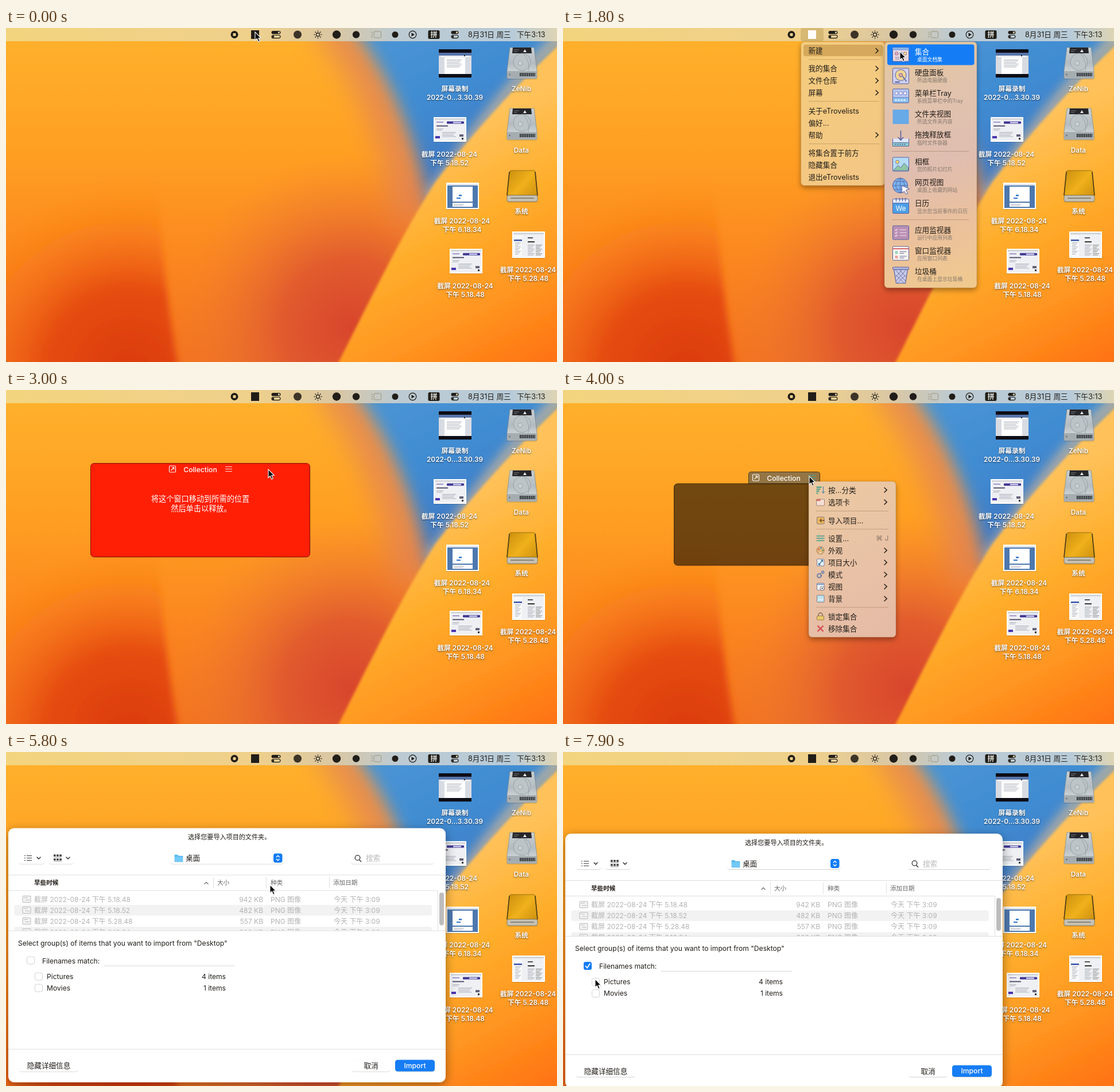
These frames come from a looping animation (960x581 px, 8 s). An HTML page:

```html
<!DOCTYPE html>
<html lang="zh-CN">
<head>
<meta charset="utf-8">
<title>Desktop</title>
<style>
html,body{margin:0;width:100%;height:100%;overflow:hidden;background:#f9951f}
svg{display:block;width:100vw;height:100vh}
text{font-family:Inter,"Noto Sans CJK SC","Noto Sans CJK",sans-serif;white-space:pre}
.hl{opacity:0}
.on .hl,.open .hl{opacity:1}
.open .hl{fill:#a9782f;fill-opacity:.42}
.on text{fill:#fff}
.on .chev{stroke:#fff}
.label text{filter:drop-shadow(0 1px 1px rgba(0,0,0,.6))}
</style>
</head>
<body>
<svg id="stage" viewBox="0 0 960 581" preserveAspectRatio="none"></svg>
<script>
const INK = '#211d18', BLUE = '#147df5', LINE = '#56609f';

const T = (x, y, s, size = 12.6, fill = INK, extra = '') =>
  `<text x="${x}" y="${y + size * .36}" font-size="${size}" fill="${fill}" ${extra}>${s}</text>`;
const R = (x, y, w, h, fill, r = 0, extra = '') =>
  `<rect x="${x}" y="${y}" width="${w}" height="${h}" rx="${r}" fill="${fill}" ${extra}/>`;
const C = (x, y, r, fill, extra = '') => `<circle cx="${x}" cy="${y}" r="${r}" fill="${fill}" ${extra}/>`;
const P = (d, stroke, w = 1, fill = 'none', extra = '') =>
  `<path d="${d}" stroke="${stroke}" stroke-width="${w}" fill="${fill}" ${extra}/>`;
const G = (x, y, s, extra = '') => `<g transform="translate(${x} ${y})" ${extra}>${s}</g>`;
const show = (id, s) => `<g id="${id}">${s}</g>`;
const MID = 'text-anchor="middle"', END = 'text-anchor="end"';
const stops = list => list.map(([o, c, a = 1]) => `<stop offset="${o}" stop-color="${c}" stop-opacity="${a}"/>`).join('');
const lin = (id, x1, y1, x2, y2, list) =>
  `<linearGradient id="${id}" gradientUnits="userSpaceOnUse" x1="${x1}" y1="${y1}" x2="${x2}" y2="${y2}">${stops(list)}</linearGradient>`;
const rad = (id, x, y, r, list) =>
  `<radialGradient id="${id}" gradientUnits="userSpaceOnUse" cx="${x}" cy="${y}" r="${r}">${stops(list)}</radialGradient>`;
const blur = n => `<filter id="b${n}" x="-40%" y="-40%" width="180%" height="180%"><feGaussianBlur stdDeviation="${n}"/></filter>`;
const shadow = (id, dy, sd, a) =>
  `<filter id="${id}" x="-20%" y="-20%" width="140%" height="140%"><feDropShadow dx="0" dy="${dy}" stdDeviation="${sd}" flood-opacity="${a}"/></filter>`;

const defs = '<defs>' +
  lin('sky', 0, 23, 0, 581, [[0, '#ffb02b'], [.35, '#ff9f22'], [.7, '#fb851f'], [1, '#f27220']]) +
  rad('ember', 215, 600, 330, [[0, '#db390f'], [.45, '#e4480f', .9], [1, '#ff8a12', 0]]) +
  rad('glow', 600, 520, 300, [[0, '#d8452c'], [.4, '#dd5530', .85], [1, '#ee8238', 0]]) +
  lin('sea', 640, 23, 760, 280, [[0, '#4a94d4'], [.5, '#3f8bd2'], [1, '#4176c0']]) +
  lin('petal', 735, 210, 930, 581, [[0, '#ffc25a'], [.35, '#ffae2c'], [.7, '#ff9420'], [1, '#ff7512']]) +
  lin('bar', 0, 0, 960, 0, [[0, '#f3d47e'], [.45, '#efd08c'], [.6, '#d9c7a4'], [.71, '#bccad2'], [.92, '#b8cbd8'], [1, '#ddd4b4']]) +
  lin('menuA', 414, 24, 560, 274, [[0, '#f4cc7d'], [1, '#f3c685']]) +
  lin('menuB', 570, 24, 700, 452, [[0, '#e4c99f'], [.25, '#e1c3ad'], [.5, '#dfbdb0'], [.75, '#ebc19d'], [1, '#f0c98e']]) +
  lin('menuC', 428, 159, 580, 430, [[0, '#eccaa2'], [.6, '#e8c1a6'], [1, '#e5baa6']]) +
  lin('steel', 0, 0, 0, 46, [[0, '#c9d0d3'], [.6, '#b3bcc1'], [1, '#d4d9da']]) +
  lin('gold', 0, 0, 50, 44, [[0, '#c98e0c'], [.55, '#f0b11c'], [1, '#cf920f']]) +
  [2, 6, 10, 14, 24].map(blur).join('') + shadow('float', 4, 5, .35) + shadow('sheet', 5, 9, .4) + shadow('lift', .6, .7, .3) +
  '<clipPath id="list"><rect x="4" y="251" width="748" height="69"/></clipPath></defs>';

const wallpaper =
  R(0, 0, 960, 581, 'url(#sky)') +
  R(270, 150, 500, 431, 'url(#glow)') +
  P('M-40 200H262Q268 420 305 620H-40Z', 'none', 0, 'url(#ember)', 'filter="url(#b6)"') +
  P('M560 -20Q680 110 715 330', '#dc8060', 70, 'none', 'filter="url(#b24)" opacity=".7"') +
  P('M580 -30Q695 105 736 310L800 310L990 0V-30Z', 'none', 0, 'url(#sea)', 'filter="url(#b14)"') +
  P('M738 295C810 190 880 95 975 5', '#f5c489', 16, 'none', 'filter="url(#b10)" opacity=".8"') +
  P('M570 600C640 462 690 358 748 268C815 182 890 95 985 10H1000V620H570Z', 'none', 0, 'url(#petal)', 'filter="url(#b2)"');

const rays = Array.from({length: 8}, (_, i) =>
  `<path d="M0 -5V-7" stroke="${INK}" stroke-width="1.3" transform="rotate(${i * 45})"/>`).join('');
const switches = (x, w) => G(x, 11.5,
  R(-w, -6.5, 2 * w, 5.6, INK, 2.8) + C(w - 3, -3.7, 1.7, '#d8c9a0') +
  R(-w + .5, 1, 2 * w - 1, 5.2, 'none', 2.6, `stroke="${INK}" stroke-width="1.2"`) + C(-w + 3, 3.6, 1.9, INK));
const menubar =
  R(0, 0, 960, 23, 'url(#bar)') + show('press', R(414, 0, 40, 23, '#b99b55', 4, 'opacity=".45"')) +
  C(398, 11.5, 6.5, INK) + R(395.5, 9, 5, 5, '#efd08c', 1) +
  `<rect id="app" x="427" y="4" width="14" height="15"/>` +
  switches(470.5, 8) + C(508, 11.5, 7, '#3d3428') +
  G(543.5, 11.5, C(0, 0, 3, 'none', `stroke="${INK}" stroke-width="1.3"`) + rays) +
  C(576, 11.5, 7.2, INK) + C(610, 11.5, 6.2, INK) +
  G(645, 11.5, R(-4, -5.5, 12.5, 11, 'none', 2, 'stroke="#9c957f"') + P('M-8.5 -4h2M-8.5 0h2M-8.5 4h2', '#9c957f', 1.6)) +
  C(678, 11.5, 5.5, INK) +
  C(708.5, 11.5, 6.3, 'none', `stroke="${INK}" stroke-width="1.2"`) + P('M706.5 8.3L712 11.5L706.5 14.7Z', 'none', 0, INK) +
  R(735.5, 4, 20, 15, INK, 2.5) + T(745.5, 11.3, '拼', 12, '#e2e4df', MID + ' font-weight="600"') +
  switches(782, 6.5) + T(805, 11.3, '8月31日 周三', 12.6) + T(890, 11.3, '下午3:13', 12.6);

const label = (x, y, ...rows) => '<g class="label">' +
  rows.map((s, i) => T(x, y + i * 15, s, 11.8, '#fff', MID + ' font-weight="600"')).join('') + '</g>';
const disk = (x, y) => G(x, y,
  P('M5 0H47L52 40V52Q52 54 50 54H2Q0 54 0 52V40Z', '#7c858a', .6, 'url(#steel)') +
  P('M10 0H42L43 10H9Z', 'none', 0, '#26282a') + P('M28 8L31 3L34 8Z', 'none', 0, '#e8e8e8') + P('M12 4h9M12 7h6', '#8a8d90', .8) +
  C(26, 25, 15, '#bcc4c8', 'stroke="#8d979c" stroke-width=".8"') + C(23, 27, 4, '#c9d0d3', 'stroke="#8d979c" stroke-width=".7"') +
  P('M30 12Q42 28 36 43', '#929ba0', .8) + R(0, 41, 52, 12.5, '#a5adb1', 2) +
  P('M22 47h27', '#303437', 6, 'none', 'stroke-dasharray="2.2 1"') + C(4.5, 47, 1.2, '#666'), 'filter="url(#lift)"');
const drive = G(873, 248,
  P('M7 0H46Q48 0 48.500 2L53 43H0L4.500 2Q5 0 7 0Z', '#8b6410', .8, 'url(#gold)') +
  P('M4 2L0 43M49 2L53 43', '#4e3d19', 1.6) + R(0, 43, 53, 11, '#c5c1b4', 3, 'stroke="#77705c" stroke-width=".7"') +
  R(6, 47, 41, 2, '#8b8675', 1), 'filter="url(#lift)"');
const page = (x, y, w, h, inner) => G(x, y, R(0, 0, w, h, '#fff', 0, 'filter="url(#lift)"') + R(2, 2, w - 4, h - 4, '#eef0f3') + inner);
const lines = (x, y, w, n, c = '#9aa0ab') => Array.from({length: n}, (_, i) => R(x, y + i * 2.5, w - i % 3 * 2, .8, c)).join('');
const webPage = (x, y) => page(x, y, 57, 43,
  R(2, 2, 53, 2.5, '#cfd3d8') + R(5, 8, 12, 1.5, '#8d7ac0') + R(23, 7.5, 30, 4, '#3d3593', 1) + R(34, 8.5, 14, 2, '#e8e8ff') +
  R(5, 14.5, 20, 1.8, '#4b4665') + lines(5, 20, 12, 2) + lines(15, 26, 24, 4) + R(3, 33, 8, 4, '#4a35b0') + R(45, 30, 7, 4, '#66627a') + R(49, 36, 3, 3, '#333'));
const desktop =
  G(754, 37, R(0, 0, 57, 49, '#101114', 1, 'filter="url(#lift)"') + R(0, 6, 57, 37, '#d7dbe2') + R(0, 6, 57, 5, '#5674a8') +
    R(3, 11, 51, 3, '#eceef2') + R(10, 14, 36, 29, '#fff') + lines(14, 18, 26, 6) + C(45, 11, 1.2, '#222')) +
  webPage(745, 155) + webPage(773, 384) +
  page(767, 269, 57, 46, R(2, 2, 53, 42, '#4d78ae') + R(2, 2, 53, 3, '#dde3ea') + R(11, 7, 35, 26, '#fff') + R(11, 35, 35, 7, '#fff') +
    R(22, 21, 5, 2.5, '#2f74d0') + R(18, 26, 7, 2, '#2f74d0') + lines(13, 37, 18, 2)) +
  page(882, 354, 57, 46, R(2, 2, 53, 3, '#d3d6da') + R(3, 7, 14, 36, '#f9f9f9') + R(3, 14, 14, 2.5, '#3550a8') + lines(5, 19, 10, 9) +
    R(27, 10, 9, 2, '#555') + R(27, 17, 12, 2, '#333') + lines(27, 23, 12, 8) + lines(41, 23, 11, 8, '#777')) +
  disk(873, 34) + disk(873, 140) + drive +
  label(782, 106, '屏幕录制', '2022-0...3.30.39') + label(772.5, 220, '截屏 2022-08-24', '下午 5.18.52') +
  label(794.5, 336, '截屏 2022-08-24', '下午 6.18.34') + label(800, 449, '截屏 2022-08-24', '下午 5.18.48') +
  label(909.5, 421, '截屏 2022-08-24', '下午 5.28.48') + label(898, 106, 'ZeNib') + label(898, 212.5, 'Data') + label(898, 319, '系统');

// Menus
const chev = (x, y) => P(`M${x - 2} ${y - 4}l4.200 4l-4.200 4`, INK, 1.5, 'none', 'class="chev" stroke-linecap="round"');
const box = (x, y, w, h, fill) => R(x, y, w, h, fill, 6, 'filter="url(#float)" stroke="#7a5a30" stroke-opacity=".35" stroke-width=".7"');
const rules = (x1, x2, ...ys) => ys.map(y => P(`M${x1} ${y}H${x2}`, '#5a3d1c', 1, 'none', 'opacity=".28"')).join('');
const hl = (x, y, w, h) => R(x, y, w, h, BLUE, 4, 'class="hl"');

const mainRows = [[39.5, '新建', 1], [70.5, '我的集合', 1], [91.5, '文件仓库', 1], [112.5, '屏幕', 1], [144, '关于eTrovelists'],
  [165, '偏好...'], [186, '帮助', 1], [217, '将集合置于前方'], [238, '隐藏集合'], [259, '退出eTrovelists']];
const mainMenu = box(414.5, 24, 146, 250, 'url(#menuA)') + rules(428, 551, 55, 127.5, 201.5) +
  mainRows.map(([y, s, sub], i) => `<g id="main${i}">${hl(419, y - 10.5, 138, 20)}${T(427.5, y, s)}${sub ? chev(547, y) : ''}</g>`).join('');

const card = (fill, h = 24) => R(0, 0, 28, h, fill, 1.5, `stroke="${LINE}"`);
const dots = (y, ...cs) => cs.map((c, i) => R(4 + i * 7.5, y, 5, 5, c, 1, `stroke="${LINE}" stroke-width=".7"`)).join('');
const checks = (c, y = 7) => [0, 1, 2].map(i => P(`M4 ${y + i * 5}l1.500 1.500l3 -3M12 ${y + i * 5}h12`, c, 1.2)).join('');
const icons = [
  card('#f0d9dc') + R(0, 0, 28, 5, '#8fb2e8', 1) + dots(8, '#f2a9b4', '#9fd0ee', '#f6d68c') + P('M4 17h20M4 20h14', LINE, .8),
  card('#cfd0ee', 27) + C(14, 12, 9.5, '#f1d596', `stroke="${LINE}"`) + C(14, 12, 3, '#f4a6a0', `stroke="${LINE}"`) + P('M24 23L17 14', LINE, 1.6) + R(4, 23, 8, 2, LINE),
  card('#b7c7f3') + dots(5, '#f6f0ff', '#f6f0ff', '#f6f0ff') + R(0, 15, 28, 9, '#8cc2ef', 1, `stroke="${LINE}" stroke-width=".8"`) + P('M4 19.500h20', '#fff', 2, 'none', 'stroke-dasharray="3 2"'),
  R(0, 0, 28, 25, '#68a9e8'),
  P('M0 14V27H28V14', LINE, 1, '#dbe5fb') + R(0, 21, 28, 6, '#8fd0cf', 1, `stroke="${LINE}"`) + P('M4 24h20', LINE, 2, 'none', 'stroke-dasharray="2 2"') + P('M14 0V16M9.500 11.500L14 16.500L18.500 11.500', LINE, 1.6),
  card('#b5dcf7') + C(8, 8, 3, '#f9d56c', `stroke="${LINE}" stroke-width=".8"`) + P('M1 23L9 14L14 18L20 10L27 18V23Z', LINE, .8, '#8fc7a6'),
  C(13, 13, 13, '#79b4ef', `stroke="${LINE}"`) + P('M0 13H26M13 0V26M3 6H23M3 20H23M13 0C3 8 3 18 13 26M13 0C23 8 23 18 13 26', LINE, .9) + P('M16 13L29 19L23 21L26 27L23 28L20 23L16 26Z', LINE, 1, '#fff'),
  card('#4d9fe6', 25) + R(0, 0, 28, 7, '#e8eefb', 1, `stroke="${LINE}"`) + P('M6 -2V4M12 -2V4M17 -2V4M22 -2V4', LINE, 1.3) + T(14, 16, 'We', 12, '#fff', MID),
  card('#b98fb4') + checks('#f5e3ee'),
  card('#fdf8f2') + P('M0 4H28', '#d66b70', 2) + R(4, 8, 5, 5, '#9ed7bd') + R(4, 16, 5, 5, '#f1a1a1') + P('M12 9h12M12 12h8M12 17h12M12 20h8', LINE, 1.1),
  P('M2 4H26L22 28H6Z', LINE, 1.2, '#c9cbe6') + R(0, 0, 28, 4, '#b5b8de', 1, `stroke="${LINE}"`) + P('M5 5L22 24M12 5L23 17M23 5L6 24M16 5L5 17M8 28L22 14M20 28L6 14', LINE, .8)];
const subRows = [[41, '集合', '桌面文档集'], [77, '硬盘面板', '所选电脑硬盘'], [113, '菜单栏Tray', '系统菜单栏中的Tray'], [149, '文件夹视图', '所选文件夹内容'],
  [185.5, '拖拽释放框', '临时文件容器'], [232, '相框', '您的照片幻灯片'], [268, '网页视图', '桌面上收藏的网站'], [304.5, '日历', '显示您当前事件的日历'],
  [351, '应用监视器', '运行中应用列表'], [387, '窗口监视器', '应用窗口列表'], [423, '垃圾桶', '在桌面上显示垃圾桶']];
const subMenu = box(560, 24, 161, 428, 'url(#menuB)') + rules(573, 707, 214.5, 333.5) +
  subRows.map(([y, a, b], i) => `<g id="sub${i}">${hl(565, y - 12.5, 151.5, 36)}${G(574.5, y - 7, icons[i])}` +
    T(613, y, a) + T(617, y + 14, b, 8.8, '#85786d') + '</g>').join('');

const mini = (fill, d, c = '#4d6b94') => R(-6, -6, 12.5, 12, fill, 1, 'stroke="#6d6a78" stroke-width=".8"') + P(d, c, 1.3);
const popRows = [
  [174, '按...分类', P('M-7 -5h9M-7 -1.500h7M-7 2h5M-7 5.500h3', '#3e9c85', 1.8) + P('M5 -6V5M2.500 2.500L5 5.500L7.500 2.500', '#4b7fa8', 1.1), 1],
  [195, '选项卡', R(-7, -5, 14, 11, '#f4ded4', 1, 'stroke="#94706a" stroke-width=".8"') + R(-7, -5, 7, 3, '#d66e62'), 1],
  [227, '导入项目...', mini('#eeb75f', 'M7 0H-1M2 -3L-1 0L2 3', '#765025')],
  [258, '设置...', P('M-7 -4h14M-7 0h14M-7 4h14', '#4e9483', 1.4) + C(-3, -4, 2, '#78bca6') + C(3, 0, 2, '#78bca6') + C(-2, 4, 2, '#78bca6')],
  [279, '外观', C(0, 0, 6.5, '#e5b57b', 'stroke="#956b3d" stroke-width=".8"') + C(-3, -2, 1.5, '#d65b52') + C(1, -4, 1.4, '#4d91cc') + C(4, 0, 1.4, '#55a765') + C(0, 4, 1.6, '#f3dfc8'), 1],
  [300, '项目大小', mini('#e5f1f8', 'M-3 4L4 -4M1 -4H4V-1M-3 1V4H0', '#3c76a8'), 1],
  [321, '模式', C(-2, 2, 3.4, 'none', 'stroke="#5a78a8" stroke-width="2.4" stroke-dasharray="2 .7"') + C(4, -4, 2, 'none', 'stroke="#5a78a8" stroke-width="2" stroke-dasharray="1.500 .5"'), 1],
  [342, '视图', mini('#eef2fa', 'M-6 -4H6', '#3e76bc') + C(3, 3, 3.5, '#fff', 'stroke="#555" stroke-width=".8"') + C(3, 3, 1.2, '#345'), 1],
  [363, '背景', mini('#c0e0ee', 'M-5 4L-1 0L2 3L5 0', '#e9f6ff'), 1],
  [394, '锁定集合', P('M-3.500 -1V-4Q0 -9 3.500 -4V-1', '#826a48', 1.3) + R(-6, -1, 12, 7, '#ecca68', 1, 'stroke="#826a48" stroke-width=".8"')],
  [415, '移除集合', P('M-5 -5L5 5M5 -5L-5 5', '#d64e55', 2.4)]];
const popup = box(428, 159, 152, 271, 'url(#menuC)') + rules(441, 567, 210.5, 242, 378) +
  popRows.map(([y, s, ico, sub], i) => `<g id="pop${i}">${hl(433, y - 10.5, 142, 20.5)}${G(448.5, y, ico)}${T(462, y, s)}${sub ? chev(562, y) : ''}</g>`).join('') +
  T(545, 258, '⌘ J', 12, '#8e7868');

// Collection window
const openIcon = (x, y) => G(x, y, R(-5.5, -5.5, 11, 11, 'none', 1.5, 'stroke="#fff" stroke-width="1.1"') + P('M-2.500 2.500L2.500 -2.500M-1 -2.700H2.700V1', '#fff', 1.1));
const bars = (x, y, c) => P(`M${x - 6} ${y - 4}h12M${x - 6} ${y}h12M${x - 6} ${y + 4}h12`, c, 1.2);
const redBox = R(.5, .5, 382, 163, '#ff1f05', 6, 'stroke="#7d1208"') + openIcon(143, 10.5) + bars(241, 10.5, '#ffe0d8') +
  T(191.5, 11.5, 'Collection', 12.2, '#fff', MID + ' font-weight="500"') +
  T(191.5, 62, '将这个窗口移动到所需的位置', 13.2, '#fff', MID) + T(193, 79.5, '然后单击以释放。', 13.2, '#fff', MID);
const darkBox = P('M323.500 163V147Q323.500 142.500 328 142.500H443Q447.500 142.500 447.500 147V163Z', '#4e3714', 1, '#8c7248', 'fill-opacity=".93"') +
  R(193.5, 163, 382, 142, '#000', 6, 'fill-opacity=".555" stroke="#3e2808"') +
  openIcon(336, 152.5) + T(384.5, 153.5, 'Collection', 12.2, '#fff', MID + ' font-weight="500"') + bars(434, 152.5, '#35aaa4');

// Import panel
const button = (x, y, w, h = 20, fill = '#fff') => R(x, y, w, h, fill, 4.5, 'filter="url(#lift)"');
const down = (x, y) => P(`M${x - 3} ${y - 1.5}l3 3l3 -3`, '#333', 1.5, 'none', 'stroke-linecap="round"');
const hr = (y, x1 = 4, x2 = 766, c = '#dedede') => P(`M${x1} ${y + .5}H${x2}`, c);
const check = (x, y) => R(x, y, 13, 13, '#fff', 3, 'stroke="#d2d2d2"');
const files = [['5.18.48', 942], ['5.18.52', 482], ['5.28.48', 557], ['6.18.34', 266]];
const fileRow = ([s, kb], i) => {
  const y = 266 + i * 19, c = '#b3b3b3';
  return (i % 2 ? R(14, y - 9.5, 728, 18.5, '#f2f2f2', 4) : '') + R(29, y - 6, 14, 11, '#f4f4f4', 1, 'stroke="#b5b5b5"') + P(`M31 ${y - 3}h7M33 ${y + 1}h8`, '#b9b9b9', 1.2) +
    T(49, y, '截屏 2022-08-24 下午 ' + s, 12, c) + T(448, y, kb + ' KB', 12, c, END) + T(461, y, 'PNG 图像', 12, c) + T(571, y, '今天 下午 3:09', 12, c);
};
const panel = R(4, 142, 762, 442, '#fff', 10, 'filter="url(#sheet)"') +
  T(317, 158, '选择您要导入项目的文件夹。', 11.1) + button(23, 184, 44) + button(74, 184, 44) + button(286, 185, 198, 19) + button(601, 185, 145, 19) +
  P('M32 190h2M32 194h2M32 198h2M36 190h9M36 194h9M36 198h9', '#333', 1.2) + down(57, 194) + down(108, 194) +
  P('M83 189.500h14M83 196.500h14', '#444', 3.5, 'none', 'stroke-dasharray="3.700 1.400"') + P('M83 192.700h14M83 199.700h14', '#888', .8) +
  P('M294 188.500h5l1.500 2H308V200.500H294Z', '#3da5e6', .6, '#5bbcf2') + R(294, 192, 14, 8.5, '#72c9f7', 1) + T(313, 194, '桌面') +
  R(466, 186, 15.5, 16, BLUE, 4) + P('M471 192.500l2.800 -2.800l2.800 2.800M471 195.500l2.800 2.800l2.800 -2.800', '#fff', 1.4) +
  C(612.5, 193.5, 4.3, 'none', 'stroke="#333" stroke-width="1.3"') + P('M615.500 197L619 200.500', '#333', 1.5) + T(627, 194, '搜索', 12.6, '#b8b8b8') +
  hr(223) + hr(250, 4, 752) + P('M361.500 227V247M453.500 227V247M563.500 227V247M752.500 251V320', '#dedede') +
  T(49, 237, '早些时候', 10.6, INK, 'font-weight="700"') + P('M345.500 239.500l3.500 -3.500l3.500 3.500', '#666', 1.1) +
  T(368, 237, '大小', 10.6, '#666') + T(461, 237, '种类', 10.6, '#666') + T(570, 237, '添加日期', 10.6, '#666') +
  `<g clip-path="url(#list)">${files.map(fileRow).join('')}</g>` + R(755, 254, 8, 57, '#bdbdbd', 4) + hr(320) +
  T(21, 342, 'Select group(s) of items that you want to import from "Desktop"', 12.1) +
  check(36.5, 365.5) + show('tick', R(36, 365, 14, 14, BLUE, 3.5) + P('M39.500 372.500l2.700 3l4.500 -7', '#fff', 1.8, 'none', 'stroke-linecap="round"')) +
  T(63, 373, 'Filenames match:', 12.1) + hr(381, 171, 399, '#d5d5d5') +
  check(50.5, 393.5) + check(50.5, 413.5) + T(71, 400, 'Pictures', 12.1) + T(71, 420, 'Movies', 12.1) +
  T(383, 400, '4 items', 12.1, INK, END) + T(383, 420, '1 items', 12.1, INK, END) + hr(526) +
  button(23, 545, 103) + T(74.5, 555, '隐藏详细信息', 12.6, INK, MID) + button(602, 545, 68) + T(636, 555, '取消', 12.6, INK, MID) +
  button(678, 545, 69, 20, BLUE) + T(712.5, 555, 'Import', 12.2, '#fff', MID + ' font-weight="500"');

const arrow = P('M0 0V14.500L3.300 11.500L5.700 17L8.200 16L5.900 10.500H10.300Z', '#fff', 1.1, '#000', 'filter="url(#lift)"');

document.getElementById('stage').innerHTML = defs + wallpaper + desktop + menubar + show('dark', darkBox) + show('red', redBox) +
  show('main', mainMenu) + show('sub', subMenu) + show('pop', popup) + show('panel', panel) + show('cursor', arrow);

const $ = id => document.getElementById(id);
const path = [[0, 434, 7], [300, 434, 7], [700, 470, 37], [1200, 510, 40], [1800, 587, 41], [2000, 587, 41], [2500, 370, 110],
  [2800, 411, 123], [3200, 503, 153], [3400, 503, 153], [3800, 429, 150], [4200, 429, 150], [4800, 461, 232], [5700, 461, 232],
  [5800, 460, 231], [6100, 460, 231], [6700, 330, 345], [7300, 41, 369], [7600, 43, 371], [7900, 56, 395]];

function cursorAt(t) {
  const i = path.findIndex(k => k[0] >= t);
  if (i < 1) return path[i < 0 ? path.length - 1 : 0].slice(1);
  const a = path[i - 1], b = path[i], u = (t - a[0]) / (b[0] - a[0]), e = u * u * (3 - 2 * u);
  return [a[1] + (b[1] - a[1]) * e, a[2] + (b[2] - a[2]) * e];
}
const visible = (id, on) => $(id).setAttribute('display', on ? 'inline' : 'none');
const move = (id, x, y) => $(id).setAttribute('transform', `translate(${x.toFixed(1)} ${y.toFixed(1)})`);

function draw(ms) {
  const t = Math.floor(ms / 100) * 100, within = (a, b) => t >= a && t < b;
  const [x, y] = cursorAt(t), menu = within(300, 2100), sub = within(800, 2100);
  visible('press', menu);
  visible('main', menu);
  visible('sub', sub);
  $('app').setAttribute('fill', menu ? '#fff' : INK);
  const inSub = sub && x > 562;
  $('main0').setAttribute('class', inSub ? 'open' : menu && y > 28 ? 'on' : '');
  $('sub0').setAttribute('class', inSub ? 'on' : '');
  visible('red', within(2200, 3200));
  move('red', x - 310, y - 11);
  visible('dark', t >= 3200);
  visible('pop', within(3900, 5100));
  popRows.forEach(([py], i) => $('pop' + i).setAttribute('class', x > 432 && Math.abs(y - py) < 10.5 ? 'on' : ''));
  visible('panel', t >= 5700);
  move('panel', 0, t < 5900 ? -9.5 : 0);
  visible('tick', t >= 7500);
  move('cursor', x, y);
}
(function loop() {
  draw(performance.now() % 8000);
  requestAnimationFrame(loop);
})();
</script>
</body>
</html>
```
